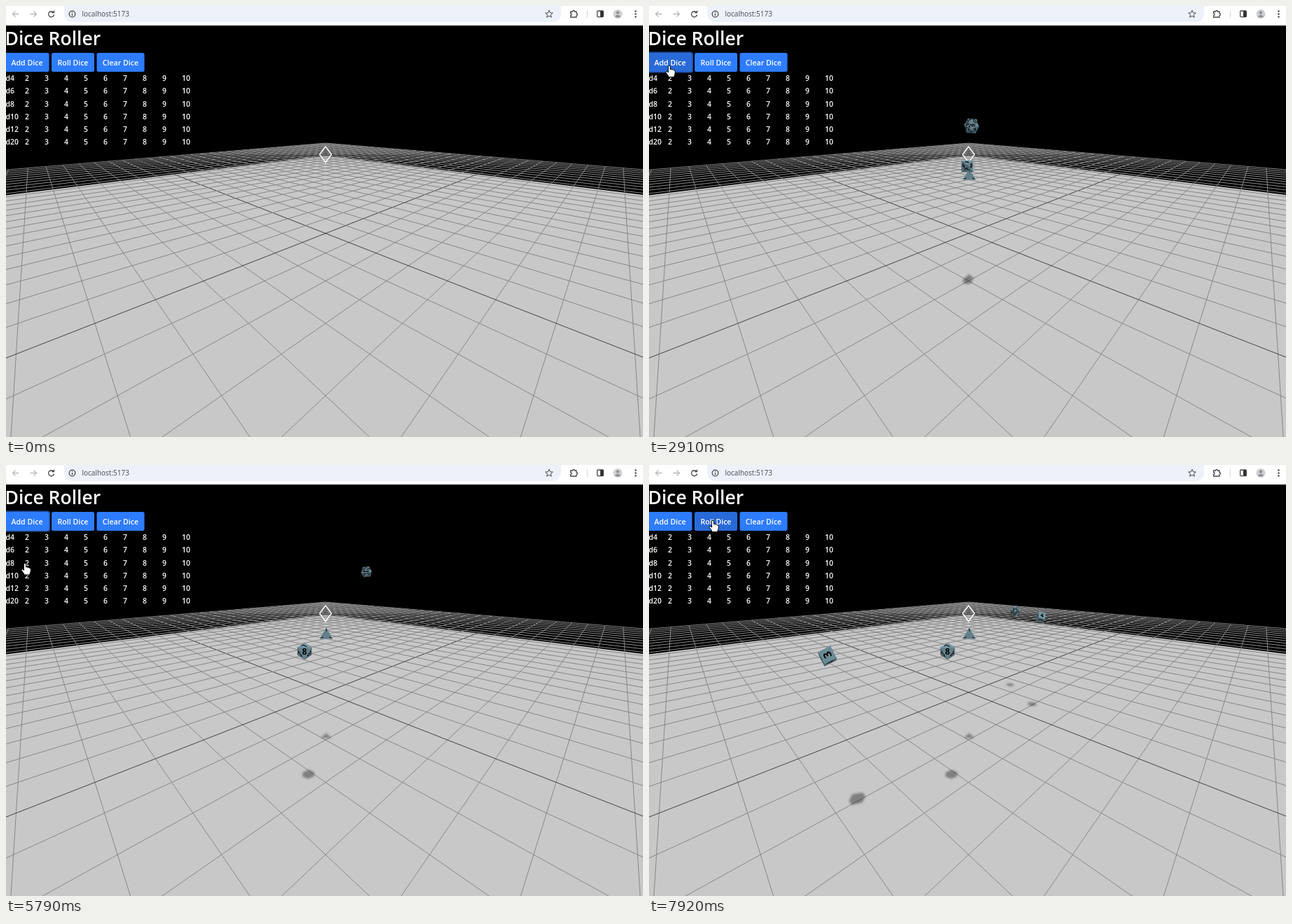
Write an HTML page with a canvas that moves like this. It is 909 px wide and 616 px high and loops after 8000 ms.

```html
<!DOCTYPE html>
<html lang="en">
<head>
<meta charset="utf-8">
<title>Dice Roller</title>
<style>
html, body { margin: 0; width: 100%; height: 100%; overflow: hidden; background: #000; }
canvas, svg { position: absolute; left: 0; top: 0; }
text { font-family: "Open Sans", "Noto Sans", sans-serif; fill: #fff; }
.table { font-size: 10.4px; font-weight: 600; }
.button text { font-size: 10.6px; font-weight: 600; }
</style>
</head>
<body>
<canvas id="scene" width="909" height="616"></canvas>
<svg id="ui" width="909" height="616" viewBox="0 0 909 616">
  <rect width="909" height="28" fill="#fff"/>
  <path d="M0 27.5H909" stroke="#dfe1e5"/>
  <path d="M83 0V11A12 12 0 0 0 95 23H780A12 12 0 0 0 792 11V0Z" fill="#edf1fa"/>
  <g fill="none" stroke="#474747" stroke-width="1.3">
    <path d="M18.500 11.500H10M13.500 7.500L9.500 11.500L13.500 15.500M34.500 11.500H43M39.500 7.500L43.500 11.500L39.500 15.500" stroke="#b9b9b9"/>
    <path d="M67.500 9A4 4 0 1 0 68.500 12.500M68.500 6.500V9.700H65.300"/>
    <circle cx="94.500" cy="11.500" r="4.300"/>
    <path d="M94.500 11V14M94.500 8.800V10"/>
    <path d="M775 6.200L776.500 9.700L780.300 10L777.400 12.500L778.300 16.200L775 14.200L771.700 16.200L772.600 12.500L769.700 10L773.500 9.700Z" stroke-width="1"/>
    <path d="M805.700 8H808.500A1.500 1.500 0 0 1 811.500 8H814V10.500A1.500 1.500 0 0 1 814 13.500V16H805.700V13.500A1.500 1.500 0 0 0 805.700 10.500Z"/>
    <path d="M829.500 6V17" stroke="#d3dcf0"/>
    <rect x="843.700" y="7" width="8.600" height="8.600" rx="1"/>
  </g>
  <rect x="848" y="7" width="4.500" height="8.600" fill="#333"/>
  <circle cx="873" cy="11.500" r="6.500" fill="#cfd0d3"/>
  <circle cx="873" cy="9.500" r="2.200" fill="#8f9196"/>
  <path d="M868.800 15.200Q873 10.500 877.200 15.200Q873 18 868.800 15.200" fill="#8f9196"/>
  <g fill="#444"><circle cx="898.500" cy="7.500" r="1.200"/><circle cx="898.500" cy="11.500" r="1.200"/><circle cx="898.500" cy="15.500" r="1.200"/></g>
  <text x="108.500" y="15" font-size="10" style="fill:#45484d">localhost:5173</text>
  <text x="-1.500" y="56" font-size="26.500" font-weight="600">Dice Roller</text>
  <g id="panel"></g>
  <g id="cursor" fill="#fff" stroke="#000" stroke-linejoin="round">
    <path id="arrow" d="M0 0V15L3.500 11.800L6 17.500L8.500 16.500L6 11H11Z"/>
    <path id="hand" d="M-1.500 1Q0 -1 1.500 1V5.500Q3.300 4.500 4 6Q5.700 5.200 6.300 6.800Q8.300 6.300 8.300 8.500V11Q8 13 7 15V16.500H-1.300V15Q-3 13 -5 9.800Q-5.200 7.500 -2.800 8.800L-1.500 10Z"/>
  </g>
</svg>
<script>
const $ = id => document.getElementById(id);
const ctx = $('scene').getContext('2d');
const LOOP = 8000, TAU = Math.PI * 2;
// Camera: distance 1 from the floor centre, looking down by PITCH.
const CX = 456, CY = 325, F = 387, PITCH = 0.4013, S = Math.sin(PITCH), C = Math.cos(PITCH);
const CELL = 0.0795;
const clamp = x => Math.min(1, Math.max(0, x));

// ---------- interface ----------
const button = (id, x, w, label) => `<g class="button"><rect id="${id}" x="${x}" y="67" width="${w}" height="27" rx="2.500"/>
  <text x="${x + w / 2}" y="85" text-anchor="middle">${label}</text></g>`;
let panel = button('add', -1.5, 63, 'Add Dice') + button('roll', 65, 61, 'Roll Dice') + button('clear', 129.5, 68, 'Clear Dice');
['d4', 'd6', 'd8', 'd10', 'd12', 'd20'].forEach((name, row) => {
  const y = 107 + row * 18.25;
  panel += `<text class="table" x="-.5" y="${y}">${name}</text>`;
  for (let n = 2; n <= 10; n++) panel += `<text class="table" x="${27 + (n - 2) * 28}" y="${y}">${n}</text>`;
});
$('panel').innerHTML = panel;

// ---------- floor ----------
// u runs away from the viewer, v to the right, h up.
function project(u, v, h = 0) {
  const z = 1 + u * C - h * S;
  return [CX + F * v / z, CY - F * (u * S + h * C) / z];
}
const floorPoint = (p, q) => project((p + q) * CELL, (p - q) * CELL);

function trace(c, points) {
  c.beginPath();
  points.forEach(p => c.lineTo(...p));
}

function makeFloor() {
  const layer = document.createElement('canvas');
  layer.width = 909;
  layer.height = 616;
  const c = layer.getContext('2d');
  c.fillRect(0, 0, 909, 616);
  const edge = 14.5;
  trace(c, [floorPoint(edge, edge), floorPoint(edge, -edge), [1400, 700], [-500, 700], floorPoint(-edge, edge)]);
  c.fillStyle = '#c8c8c8';
  c.fill();
  for (let k = -25; k <= 25; k++) {
    const near = Math.max(-25, -12.9 - k);
    if (near >= 25) continue;
    c.strokeStyle = k ? '#888' : '#444';
    trace(c, [floorPoint(k, near), floorPoint(k, 25)]);
    c.stroke();
    trace(c, [floorPoint(near, k), floorPoint(25, k)]);
    c.stroke();
  }
  return layer;
}
const floor = makeFloor();

// ---------- solids ----------
const sub = (a, b) => a.map((x, i) => x - b[i]);
const dot = (a, b) => a[0] * b[0] + a[1] * b[1] + a[2] * b[2];
const cross = (a, b) => [a[1] * b[2] - a[2] * b[1], a[2] * b[0] - a[0] * b[2], a[0] * b[1] - a[1] * b[0]];
const unit = a => a.map(x => x / Math.hypot(...a));
const mean = list => [0, 1, 2].map(i => list.reduce((sum, p) => sum + p[i], 0) / list.length);
const ring = (y, start) => [0, 1, 2].map(i => {
  const a = TAU * (start + i / 3), r = Math.sqrt(1 - y * y);
  return [r * Math.cos(a), y, r * Math.sin(a)];
});

// Convex hull by brute force: each face is a list of its corners in order.
function solid(verts) {
  const faces = [], seen = new Set();
  for (let i = 0; i < verts.length; i++)
    for (let j = i + 1; j < verts.length; j++)
      for (let k = j + 1; k < verts.length; k++) {
        let n = unit(cross(sub(verts[j], verts[i]), sub(verts[k], verts[i])));
        if (dot(n, verts[i]) < 0) n = n.map(x => -x);
        const level = dot(n, verts[i]);
        const key = n.map(x => Math.round(x * 100) + 0).join();
        if (seen.has(key) || verts.some(v => dot(n, v) > level + 1e-4)) continue;
        seen.add(key);
        const points = verts.filter(v => dot(n, v) > level - 1e-4);
        const mid = mean(points), e = unit(sub(points[0], mid)), f = cross(n, e);
        const angle = p => (Math.atan2(dot(sub(p, mid), f), dot(sub(p, mid), e)) + TAU + 1e-6) % TAU;
        faces.push(points.sort((a, b) => angle(a) - angle(b)));
      }
  return faces;
}
const signs = [-1, 1];
const cube = solid(signs.flatMap(x => signs.flatMap(y => signs.map(z => unit([x, y, z])))));
const tetra = solid([[0, 1, 0], ...ring(-1 / 3, 1 / 12)]);
const octa = solid([...ring(-Math.sqrt(1 / 3), 1 / 4), ...ring(Math.sqrt(1 / 3), 1 / 12)]);
const icosa = solid(signs.flatMap(a => signs.flatMap(b => {
  const g = 1.618034 * b;
  return [[0, a, g], [a, g, 0], [g, 0, a]].map(unit);
})));

// ---------- motion ----------
// Every die appears at SPAWN, is thrown up by `lift`, sinks to its resting
// height and slides to `end` while its `spin` runs out into `turn`.
const SPAWN = [-0.308, 0, 0.318], RADIUS = 0.0175;
const dice = [
  { faces: tetra, size: .4, born: 1400, end: [-.301, .0016, .27], sink: .075, dur: 700, spin: [0, 0, 0] },
  { faces: octa, size: .85, labels: '12384567', born: 1800, delay: 1000, end: [-.452, -.037, .271],
    sink: .021, dur: 2900, spin: [0, -4.5, 0] },
  { faces: icosa, size: .7, born: 2750, end: [.077, .164, .28], lift: .54, sink: .14, dur: 4000, power: 1,
    turn: [.3, .2, .4], spin: [-7, -4, -3] },
  { faces: cube, size: .95, labels: '142365', born: 6680, end: [-.528, -.22, .281], sink: .1, dur: 1500,
    turn: [.36, 0, .2], spin: [-.4, -3, 2] },
  { faces: cube, size: .95, labels: '165243', born: 6680, end: [-.094, .219, .284], sink: .1, dur: 1500,
    turn: [.1, .1, -.1], spin: [.5, 3, -2] }
];

function place(die, t) {
  const { born, delay = 0, dur, power = 2, lift = 0, sink, end, turn = [0, 0, 0], spin } = die;
  const left = 1 - clamp((t - born - delay) / dur), gone = 1 - left ** power, age = (t - born) / 1000;
  const [u, v] = SPAWN.map((a, i) => a + (end[i] - a) * gone);
  const h = Math.max(end[2], SPAWN[2] + lift * (1 - Math.exp(-age)) - sink * age);
  const [x, y] = project(u, v, h);
  return { die, u, v, h, x, y, r: RADIUS * F / (1 + u * C - h * S), turn: turn.map((a, i) => a + spin[i] * left) };
}

const rotate = (p, i, j, angle) => {
  const q = p.slice(), c = Math.cos(angle), s = Math.sin(angle);
  q[i] = p[i] * c - p[j] * s;
  q[j] = p[i] * s + p[j] * c;
  return q;
};
const pose = (p, [a, b, c]) => rotate(rotate(rotate(p, 2, 0, a), 1, 2, b), 0, 1, c);

// ---------- drawing ----------
function drawShadow({ die, u, v, h, turn }) {
  const alpha = .36 * clamp((.35 - h) / .02);
  if (!alpha) return;
  ctx.save();
  ctx.filter = 'blur(1.6px)';
  ctx.fillStyle = `rgba(0,0,0,${alpha})`;
  ctx.beginPath();
  die.faces.forEach(face => {
    const points = face.map(p => pose(p, turn));
    if (mean(points)[1] <= 0) return;
    points.forEach(([x, , z], i) => ctx[i ? 'lineTo' : 'moveTo'](...project(u - z * RADIUS, v + x * RADIUS)));
    ctx.closePath();
  });
  ctx.fill();
  ctx.restore();
}

const LIGHT = unit([.25, .8, .6]);

function drawDigit({ die, x, y, r }, label, mid, up, n) {
  const right = cross(up, n), s = r / 20;
  ctx.save();
  ctx.transform(right[0] * s, -right[1] * s, -up[0] * s, up[1] * s, x + mid[0] * r, y - mid[1] * r);
  ctx.font = `bold ${20 * die.size}px "Open Sans", sans-serif`;
  ctx.textAlign = 'center';
  ctx.fillStyle = '#000';
  ctx.fillText(label, 0, 7 * die.size);
  ctx.restore();
}

function drawDie(item) {
  const { die, x, y, r, turn } = item;
  die.faces.forEach((face, i) => {
    const points = face.map(p => rotate(pose(p, turn), 1, 2, PITCH)), mid = mean(points), n = unit(mid);
    if (n[2] <= 0) return;
    const k = .66 + .4 * Math.max(0, dot(n, LIGHT));
    ctx.fillStyle = ctx.strokeStyle = `rgb(${[113, 146, 158].map(c => Math.round(c * k))})`;
    ctx.lineWidth = .5;
    trace(ctx, points.map(p => [x + p[0] * r, y - p[1] * r]));
    ctx.closePath();
    ctx.fill();
    ctx.stroke();
    if (die.faces === tetra) {
      points.forEach((p, j) => drawDigit(item, (i + j) % 4 + 1, mean([mid, p, p]), unit(sub(p, mid)), n));
    } else {
      const base = points.length === 4 ? mean(points.slice(1, 3)) : points[0];
      drawDigit(item, die.labels ? die.labels[i] : i + 1, mid, unit(sub(mid, base)), n);
    }
  });
}

function drawSpawner() {
  trace(ctx, [[CX, 201], [464.5, 212], [CX, 223.5], [447.5, 212]]);
  ctx.closePath();
  ctx.strokeStyle = '#fff';
  ctx.lineWidth = 1.4;
  ctx.stroke();
}

// Stops of the pointer: time, x, y.
const stops = [[130, 792, 529], [740, 21, 84], [1890, 21, 84], [2910, 29, 85], [3600, 29, 85],
  [4030, 104, 88], [5040, 25, 161], [6540, 29, 120], [6790, 29, 120], [7920, 91, 79]];

function pointerAt(t) {
  const i = stops.findLastIndex(s => s[0] <= t), a = stops[i], b = stops[i + 1] || a;
  const s = clamp((t - a[0]) / (b[0] - a[0] || 1)), e = s * s * (3 - 2 * s);
  return [1, 2].map(n => a[n] + (b[n] - a[n]) * e);
}

function drawInterface(t) {
  const fill = (id, dark) => $(id).setAttribute('fill', dark ? '#296ad9' : '#2e7cff');
  fill('add', t >= 700 && t < 3850);
  fill('roll', t >= 7750);
  fill('clear', false);
  const focus = t >= 1150 && t < 6660;
  $('add').setAttribute('style', focus ? 'stroke:#1d4c98;stroke-width:3;paint-order:stroke' : '');
  const shown = t >= 130, hand = t >= 700;
  $('cursor').style.display = shown ? '' : 'none';
  if (!shown) return;
  $('cursor').setAttribute('transform', `translate(${pointerAt(t)})`);
  $('hand').style.display = hand ? '' : 'none';
  $('arrow').style.display = hand ? 'none' : '';
}

function frame(now) {
  const t = now % LOOP;
  ctx.drawImage(floor, 0, 0);
  const live = dice.filter(d => t >= d.born).map(d => place(d, t));
  live.forEach(drawShadow);
  [...live, { y: 216 }].sort((a, b) => a.y - b.y).forEach(item => item.die ? drawDie(item) : drawSpawner());
  drawInterface(t);
  requestAnimationFrame(frame);
}
requestAnimationFrame(frame);
</script>
</body>
</html>
```
